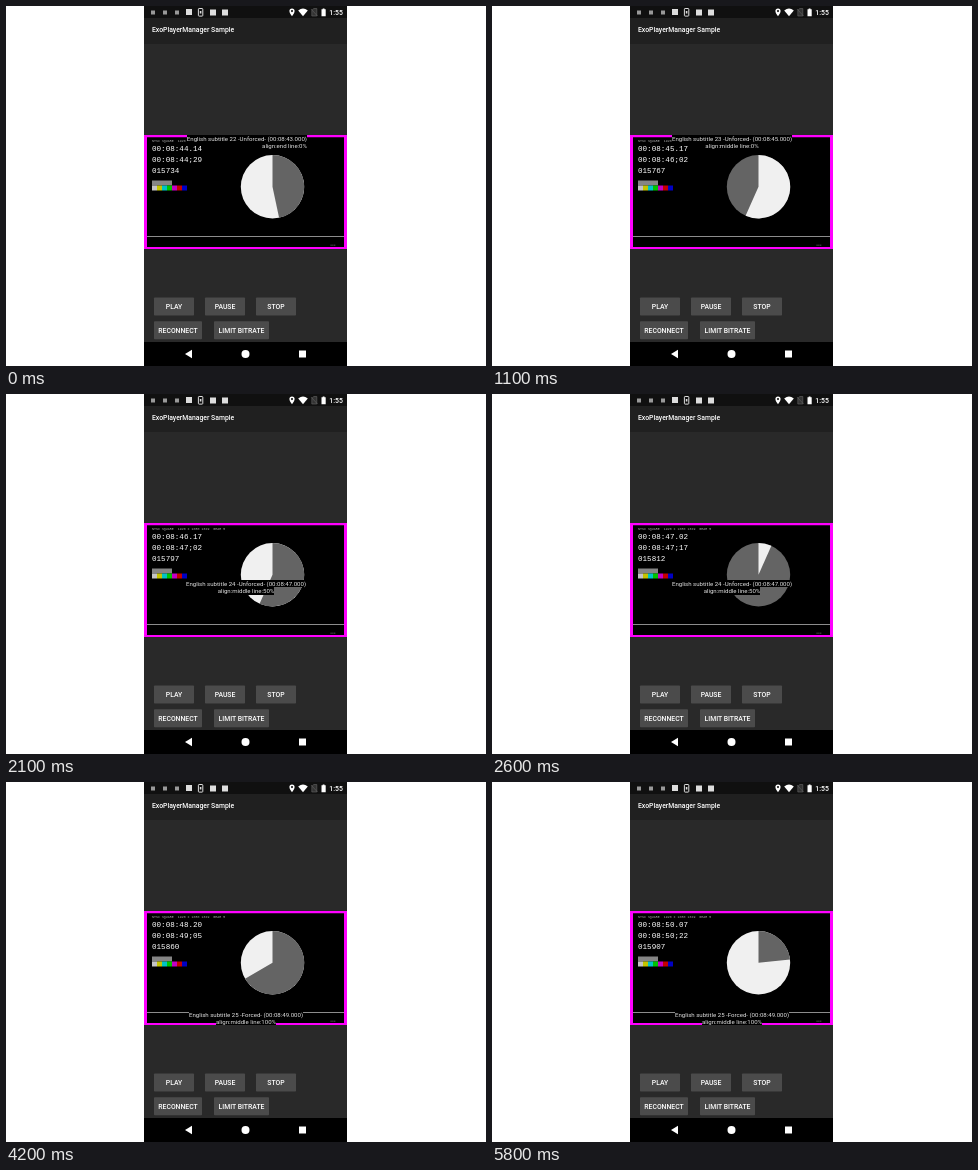
Animation of 480 by 360 pixels, one loop 5900 ms. Source, as an HTML page:

```html
<!DOCTYPE html>
<html lang="en">
<head>
<meta charset="utf-8">
<title>Player sample</title>
<style>
html, body { margin: 0; width: 100%; height: 100%; overflow: hidden; background: #fff; }
svg { position: absolute; left: 0; top: 0; }
text { fill: #fff; font: 500 6.85px Roboto, sans-serif; }
.tc text { font: 7.6px "Liberation Mono", monospace; white-space: pre; }
.tc .label { font-size: 3.3px; fill: #aaa; }
#sub {
  position: absolute; left: 140px; width: 200px; text-align: center;
  font: 6.08px/7.13px Roboto, sans-serif; color: #e4e4e4; white-space: pre;
}
#sub.end { width: 161px; text-align: right; }
#sub div { height: 7.13px; }
#sub span { display: inline-block; height: 7.13px; background: #000; }
</style>
</head>
<body>
<svg width="480" height="360" viewBox="0 0 480 360">
  <!-- app chrome -->
  <path fill="#292929" d="M138 0h203v360h-203z"/>
  <path fill="#202020" d="M138 12h203v26h-203z"/>
  <path fill="#101010" d="M138 0h203v12h-203z"/>
  <path fill="#000" d="M138 336h203v24h-203z"/>
  <text x="146" y="26.4">ExoPlayerManager Sample</text>

  <!-- status bar -->
  <g fill="#ddd">
    <path d="M145 4.5h4v4h-4zM157 4.5h4v4h-4zM169 4.5h4v4h-4z" fill="#999"/>
    <path d="M180 3h6v6h-6zM204 3.5h6v6h-6zM216 3.5h6v6h-6z"/>
    <rect x="192.4" y="2.5" width="4.4" height="7.6" rx=".7" fill="none" stroke="#ddd"/>
    <path d="M193.8 5h1.6v2.5h-1.6z"/>
    <path fill-rule="evenodd" d="M286 10.3C284.5 8 283.4 6.6 283.4 5a2.6 2.6 0 0 1 5.2 0C288.6 6.600 287.500 8 286 10.300zM286 4a1 1 0 1 0 .01 0z" fill="#fff"/>
    <path d="M292.200 4.400Q297 .8 301.800 4.400L297 10.200z" fill="#fff"/>
    <path d="M305.800 4.300l2-1.800h3v7.500h-5zM305 3l6.500 7" fill="#333" stroke="#666" stroke-width=".6"/>
    <path d="M315.500 3.300h1.200v-.9h1.800v.9h1.200v7h-4.200z" fill="#fff"/>
  </g>
  <text x="323.300" y="9">1:55</text>

  <!-- video -->
  <path fill="#f0f" d="M138 129h203v114h-203z"/>
  <path fill="#000" d="M141 131.300h197v109.700h-197z"/>
  <path fill="#8c8c8c" d="M141 230h197v.9h-197z"/>
  <path fill="#777" d="M324.500 238.700h1.200v.8h-1.200zM326.300 238.700h1.200v.8h-1.200zM328.100 238.700h1.200v.8h-1.200z"/>
  <g class="tc">
    <text class="label" x="146" y="135.800" font-size="3.300">NTSC SQUARE  1920 x 1080 16x9  GEAR 5</text>
    <text id="full" x="146" y="145"></text>
    <text id="drop" x="146" y="156"></text>
    <text id="count" x="146" y="166.800"></text>
  </g>
  <path fill="#858585" d="M146 174.500h20v5h-20z"/>
  <g id="bars"></g>
  <circle id="disc" cx="266.500" cy="180.800" r="31.700"/>
  <path id="slice"/>

  <g id="buttons" text-anchor="middle"></g>

  <!-- navigation bar -->
  <g fill="#fff">
    <path d="M179 348l7-4.200v8.400z"/>
    <circle cx="239.500" cy="348" r="4"/>
    <path d="M293 344.500h7v7h-7z"/>
  </g>
</svg>
<div id="sub"><div><span></span></div><div><span></span></div></div>
<script>
const $ = id => document.getElementById(id);
const LOOP = 5900, STEP = 100, FIRST = 15734, LAST = 15907;
const WHITE = '#f0f0f0', GRAY = '#646464';
const PIE = { x: 266.5, y: 180.8, r: 31.7 };
const CUES = [
  { y: 129.1, id: 22, kind: 'Unforced', at: 43, note: 'align:end line:0%' },
  { y: 129.1, id: 23, kind: 'Unforced', at: 45, note: 'align:middle line:0%' },
  { y: 186.3, id: 24, kind: 'Unforced', at: 47, note: 'align:middle line:50%' },
  { y: 228.5, id: 25, kind: 'Forced', at: 49, note: 'align:middle line:100%' }
];

$('bars').innerHTML = ['#c4c4c4', '#c4c400', '#00c4c4', '#00c400', '#c400c4', '#c40000', '#0000c4']
  .map((c, i) => `<rect x="${146 + i * 5}" y="179.5" width="5" height="5" fill="${c}"/>`).join('');

$('buttons').innerHTML = [
  ['PLAY', 148, 291.5, 40], ['PAUSE', 199, 291.5, 40], ['STOP', 250, 291.5, 40],
  ['RECONNECT', 148, 315.3, 48], ['LIMIT BITRATE', 208, 315.3, 55]
].map(([label, x, y, w]) =>
  `<rect x="${x}" y="${y}" width="${w}" height="18" rx=".8" fill="#4b4b4b"/>
   <text x="${x + w / 2}" y="${y + 11.5}">${label}</text>`).join('');

const pad = n => String(n).padStart(2, '0');

function timecode(n, sep) {
  const s = Math.floor(n / 30);
  return `00:${pad(Math.floor(s / 60))}:${pad(s % 60)}${sep}${pad(n % 30)}`;
}

function drawPie(n) {
  const odd = Math.floor(n / 30) % 2;
  const turn = n % 30 / 30, a = turn * 2 * Math.PI;
  const { x, y, r } = PIE;
  $('disc').setAttribute('fill', odd ? GRAY : WHITE);
  $('slice').setAttribute('fill', odd ? WHITE : GRAY);
  $('slice').setAttribute('d', `M${x} ${y}V${y - r}A${r} ${r} 0 ${turn > .5 ? 1 : 0} 1 ` +
    `${x + r * Math.sin(a)} ${y - r * Math.cos(a)}Z`);
}

function drawCue(t) {
  // each cue lasts two seconds; the first ends right after the loop starts
  const i = Math.ceil(t / 2000), cue = CUES[i];
  const [top, bottom] = $('sub').querySelectorAll('span');
  $('sub').style.top = cue.y + 'px';
  $('sub').className = i ? '' : 'end';
  top.textContent = `English subtitle ${cue.id} -${cue.kind}- (00:08:${cue.at}.000)`;
  bottom.textContent = cue.note;
}

function draw(now) {
  const t = Math.floor(now % LOOP / STEP) * STEP;
  const n = Math.min(FIRST + Math.round(t * .03), LAST);
  $('full').textContent = timecode(n, '.');
  $('drop').textContent = timecode(n + 15, ';');
  $('count').textContent = '0' + n;
  drawPie(n);
  drawCue(t);
}

const start = performance.now();
function tick() {
  draw(performance.now() - start);
  requestAnimationFrame(tick);
}
tick();
</script>
</body>
</html>
```
